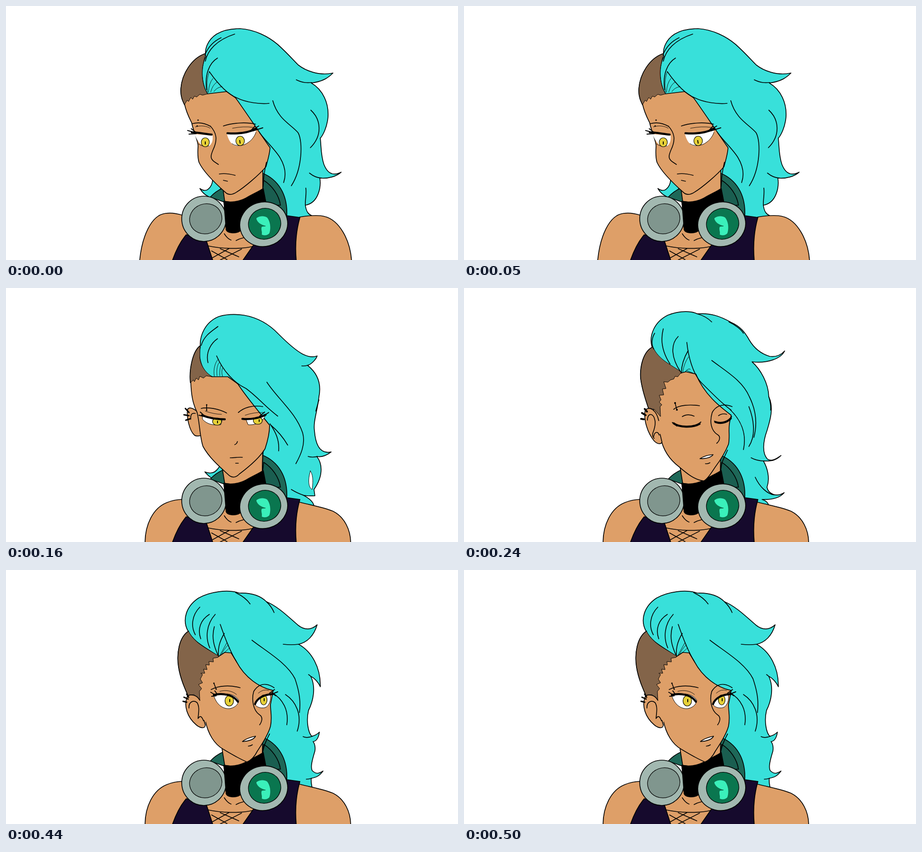
An HTML page for the animation above (0.54 s loop, 998x561 px).

```html
<!DOCTYPE html>
<html lang="en">
<head>
<meta charset="utf-8">
<title>Head turn</title>
<style>
html, body { margin: 0; height: 100%; overflow: hidden; background: #fff }
svg { display: block; width: 100vw; height: 100vh }
path, ellipse { stroke: #000; stroke-width: 1.7; stroke-linecap: round; stroke-linejoin: round; fill: none }
.hair { fill: #38e0da }
.skin { fill: #de9f68 }
.shaved { fill: #836449; stroke-width: 1 }
.vest { fill: #160a2d }
.black { fill: #000 }
.white { fill: #fff; stroke-width: 1 }
.bare { stroke: none }
.iris { fill: #e6d038; stroke-width: 1.2 }
.thin { stroke-width: .9 }
.lash { stroke-width: 4.5 }
.flick { stroke-width: 2 }
.ring { stroke-width: 3 }
.stud { stroke-width: 4 }
.band { fill: #1e6858 }
.deep { fill: #1a5e50 }
.cup { fill: #a2b8b0 }
.pad { fill: #80968e; stroke-width: 1.3 }
.disc { fill: #0a764f; stroke-width: 1.3 }
.leaf { fill: #3af0ba; stroke: #0b5a42; stroke-width: .8 }
</style>
</head>
<body>
<svg viewBox="0 0 998 561">
<!-- hair behind the body -->
<g data-pose="01">
  <path class="hair" d="M441 112C438 95 445 75 465 62C480 53 500 50 517 50C550 52 580 68 600 85C620 103 635 120 645 130C660 142 690 155 722 148C712 158 700 167 674 170C700 185 713 215 711 245C709 268 700 285 694 292C696 310 695 330 702 350C708 365 718 378 740 367C730 376 712 382 693 380C696 400 690 435 661 440C663 455 668 460 675 463L640 475L580 440L500 330L460 200L445 194C433 175 432 150 434 135C436 122 438 118 441 112Z"/>
  <path class="hair" d="M428 403C436 409 443 408 447 404C452 400 456 392 456 385L480 398L452 424C445 419 436 417 428 403Z"/>
</g>
<g data-pose="2">
  <path class="hair" d="M429 130C427 105 440 75 470 63C490 57 510 58 525 60C560 66 585 84 602 102C620 120 640 138 655 146C667 152 677 154 687 150C685 157 675 168 666 171C690 190 696 215 691 240C688 270 678 295 681 315C683 340 690 368 718 362C705 372 695 374 686 372C697 385 703 412 680 445L682 459C675 459 662 460 655 457C665 462 678 470 680 481L640 475L580 440L500 330L470 200L455 196C432 185 424 155 429 130Z"/>
  <path class="white" d="M672 404C680 415 677 435 676 445C668 441 666 425 672 404Z"/>
  <path class="hair" d="M439 406C447 410 457 409 462 405C468 400 472 395 474 388L481 402L458 423C450 417 445 414 439 406Z"/>
</g>
<g data-pose="3">
  <path class="hair" d="M415 130C408 105 420 75 450 60C480 48 505 52 515 57C545 55 565 62 590 76C610 85 620 97 630 115C640 132 655 145 675 151C690 153 700 148 708 139C700 156 670 167 636 163C655 180 672 210 673 240C685 265 675 295 669 315C660 340 658 365 670 378C680 384 690 377 700 370C690 380 680 383 661 382C670 397 676 420 669 440C672 455 690 463 707 452C697 464 680 468 658 467C668 470 672 475 673 481L640 475L580 440L500 330L485 200L478 188C450 165 425 160 415 130Z"/>
</g>
<g data-pose="4">
  <path class="hair" d="M402 135C388 110 398 80 425 62C450 48 490 42 515 51C540 50 560 55 575 70C600 80 625 105 645 122C660 134 675 132 687 121C680 145 665 160 646 164C675 180 695 215 694 258C690 248 680 238 673 235C685 260 678 290 668 310C662 335 668 360 675 367C682 366 688 362 692 358C690 372 685 378 678 379C683 385 683 395 682 400C676 420 672 435 676 443C685 452 692 449 700 444C692 455 685 458 674 460C673 470 675 475 676 481L640 475L580 440L500 330L475 205L468 190C440 170 415 160 402 135Z"/>
</g>

<!-- body and headphones -->
<path class="band" d="M451 422C460 412 470 406 479 402L484 434ZM566 369C600 383 622 415 620 462L575 445L566 405Z"/>
<path class="deep" d="M569 385C588 397 603 418 606 440L575 440L567 403Z"/>
<path class="skin" data-pose="01" d="M295 563C300 510 320 462 352 458C366 456 380 459 389 462L440 500L483 480L483 432L478 395L567 345L567 405L575 500L649 466C668 463 690 461 704 465C735 473 760 515 763 563Z"/>
<path class="skin" data-pose="234" d="M307 563C307 522 325 486 355 474C367 469 380 467 389 467L440 500L483 480L483 432L477 395L567 345L566 405L575 500L648 473C680 481 704 485 722 493C748 506 761 535 761 563Z"/>
<path d="M482 503C487 511 491 515 497 517M524 512Q515 514 508 518M447 530C475 536 515 538 545 531M473 536L514 554M454 541L488 560M520 537L473 561M492 536L456 556"/>
<path class="vest" d="M367 563C375 540 385 520 398 505L443 520L457 563ZM522 563L545 530L600 470L620 463L649 467C641 495 638 530 641 563Z"/>
<path class="black" d="M481 431C495 435 515 432 530 424C545 415 558 410 568 403L574 434C545 440 520 465 517 497C510 502 490 504 486 494Z"/>
<ellipse class="cup" cx="437" cy="470" rx="49" ry="50"/>
<ellipse class="pad" cx="441" cy="470" rx="36" ry="33" transform="rotate(-20 441 470)"/>
<path class="black" d="M481 431L505 434L517 490C512 502 490 504 486 494Z"/>
<ellipse class="cup" cx="569" cy="482" rx="53" ry="49" transform="rotate(-15 569 482)"/>
<ellipse class="disc" cx="571" cy="481" rx="36" ry="34" transform="rotate(-20 571 481)"/>
<path class="leaf" d="M552 469C558 463 570 462 577 467C584 476 586 490 582 502C577 508 569 508 564 505C566 499 561 491 565 487L573 486C563 484 554 478 552 469Z"/>

<!-- looking down -->
<g data-pose="01">
  <path class="skin" d="M394 216C398 235 405 248 410 258C413 275 425 300 424 310C423 325 423 335 426 345C435 365 460 390 486 413C492 418 500 416 506 413C525 402 560 372 574 355C578 340 582 328 583 313C560 280 530 235 507 203L487 189L445 194L420 180L395 200Z"/>
  <path class="shaved" d="M440 105C410 115 388 150 386 183C385 200 390 210 394 218L400 208L403 211L408 202L412 206L416 199L421 201L428 195L434 197L445 194C433 175 432 150 434 135Z"/>
  <path d="M440 105C410 115 388 150 386 183C385 200 390 210 394 218M449 145C470 175 490 195 510 203C530 213 560 217 581 215M560 280C575 300 595 318 605 335C614 350 620 370 613 390M589 209C600 250 630 262 645 280C656 300 654 360 630 397M673 230C695 250 700 285 672 313M641 163C655 170 665 170 675 169M670 369C680 377 690 380 697 380M662 402C664 415 660 430 661 440M440 122C445 98 465 75 505 62M440 106C447 90 458 78 475 70M443 185C438 150 450 125 467 115M575 345C570 365 568 385 567 405"/>
  <path class="thin" d="M445 191C442 170 445 155 449 145M447 191Q448 170 457 160M452 190Q456 174 466 168M459 189Q465 180 477 178M418 267C430 263 443 265 451 270M500 270Q525 265 545 268"/>
  <path class="white bare" d="M416 283L456 286C458 300 452 308 447 310C432 312 423 300 416 283ZM488 283C492 300 500 308 510 309C535 308 550 290 552 275Z"/>
  <path class="thin" d="M424 304Q436 313 448 309M499 304Q510 312 527 306C540 300 548 290 552 279"/>
  <g id="gaze">
    <ellipse class="iris" cx="440" cy="301" rx="9" ry="10"/>
    <ellipse class="iris" cx="517" cy="298" rx="9.5" ry="10.5"/>
    <path class="flick" d="M440 300v5M516 297l1 6"/>
  </g>
  <path class="lash" d="M410 279C425 279 440 283 454 284M489 281C515 283 535 280 553 271"/>
  <path class="flick" d="M401 275L416 279M404 283L420 282M409 271L418 278M545 276L567 269M543 274L558 265M540 276L550 265"/>
  <path d="M451 265C465 280 468 295 457 318C452 330 450 337 460 344L469 350M411 260C425 256 440 259 452 266M480 265C500 258 530 256 551 261M471 371C483 369 495 371 506 374M480 385L489 387"/>
  <path class="ring" d="M424 252h.1M422 265h.1"/>
</g>

<!-- glancing aside -->
<g data-pose="2">
  <path class="skin" d="M425 275C410 262 403 264 401 268C398 285 405 315 416 325C420 328 425 327 430 326Z"/>
  <path class="skin" d="M408 208C409 235 412 255 422 275C428 300 428 330 435 350C450 378 480 402 494 415C500 419 508 419 515 411C535 396 560 375 572 355C577 340 582 320 582 303C560 275 530 240 512 212L490 196L455 196L425 180L410 195Z"/>
  <path class="shaved" d="M428 128C412 140 404 180 407 209L414 203L416 207L420 199L425 203L428 195L436 199L442 194L455 196C438 185 430 170 428 155Z"/>
  <path d="M428 128C412 140 404 180 407 209M418 277C410 275 407 280 408 290M465 150C480 185 505 210 530 222C555 240 570 260 600 283M576 208C600 245 640 275 655 320C662 345 650 370 640 388M583 300C595 318 604 335 602 360M585 303C605 320 615 335 622 347M431 127C437 105 455 95 468 85M446 165C440 140 455 120 467 112M653 172Q660 173 668 170M691 247L684 272M667 372Q676 375 688 372M655 457Q643 453 630 445M568 360C566 380 566 395 566 405"/>
  <path class="thin" d="M460 195C457 180 462 163 469 157M466 194C464 178 468 165 472 164M472 194Q471 178 475 170M478 195Q475 185 478 177M440 272Q460 279 476 279M528 281Q548 274 568 275"/>
  <path class="white" d="M434 282L478 290L474 302C455 304 443 300 434 290ZM530 290L572 283C565 298 550 303 535 302Z"/>
  <ellipse class="iris" cx="466" cy="295" rx="10" ry="8"/>
  <ellipse class="iris" cx="556" cy="293" rx="10" ry="8"/>
  <path class="flick" d="M467 294v4M559 291v4"/>
  <path class="lash" d="M433 281C447 287 465 290 483 290M522 289C540 291 560 287 573 280"/>
  <path class="flick thin" d="M426 281L442 285M429 274L440 284M566 284L580 275M560 283L571 274"/>
  <path d="M431 266C445 262 470 267 487 276M513 275C525 264 545 258 567 262M505 346C508 345 510 343 511 339M495 375C505 375 515 373 522 374M507 387h6M443 258v12"/>
  <path class="ring" d="M443 258h.1M443 270h.1M396 266L404 275M393 280L404 282M397 292L406 289"/>
</g>

<!-- eyes closed -->
<g data-pose="3">
  <path class="skin" d="M434 330C440 360 455 380 475 395C490 408 510 425 530 426C540 420 548 405 555 395C570 375 580 355 584 345C588 325 582 310 588 290L590 281C565 262 530 235 512 190L490 185L478 188L450 185L415 230L420 285Z"/>
  <path class="shaved" d="M417 130C395 140 388 175 390 200C393 225 402 250 407 265L420 268L434 284L433 262L437 258L431 252L435 247L431 237L441 236L438 223L446 222L441 207L450 208L456 203L463 201L466 195L472 196L480 186C460 170 430 160 417 130Z"/>
  <path class="skin bare" d="M430 295C425 270 410 260 400 270C396 290 405 320 420 338C428 346 436 345 437 340L445 320Z"/>
  <path d="M417 130C395 140 388 175 390 200C393 225 402 250 407 265M430 293C425 270 410 260 400 270C396 290 405 320 420 338C428 346 436 345 437 340L433 323M405 292C405 275 418 276 421 290C424 300 421 310 417 320Q415 328 420 332M419 328C420 318 428 315 431 325"/>
  <path d="M440 90C432 120 440 145 455 168M473 107C455 125 458 155 478 185M419 135C412 122 416 108 421 100M492 120C495 150 505 190 525 210C550 235 570 255 590 270M547 160C580 185 615 205 630 240C645 270 648 300 640 330M587 268C610 290 625 320 617 357M629 262C640 290 645 325 629 350M515 57C530 61 540 68 547 75M585 75C600 82 612 92 617 100M495 138C485 155 480 170 480 188M634 375C645 381 655 382 663 382M643 418C653 440 670 455 685 457M673 240Q678 255 677 270M582 358C574 375 568 385 566 405"/>
  <path class="thin" d="M483 186Q486 165 496 152M487 186Q497 175 500 180M491 182L506 188"/>
  <path class="lash" d="M463 299C475 308 505 309 520 300M555 296C565 300 580 298 589 288"/>
  <path class="flick" d="M460 297L470 305M523 296L512 304M553 294L562 299M591 284L584 293"/>
  <path d="M463 268C474 258 500 257 520 260M482 284C490 279 500 279 508 283M592 262C570 253 555 262 548 275C542 295 545 315 560 324C567 328 565 337 558 343M562 282Q570 276 580 279M533 388Q538 389 543 386M466 254L470 269"/>
  <path class="white" style="stroke-width:1.7" d="M521 377C532 370 540 369 550 368C545 375 535 377 521 377Z"/>
  <path class="stud" d="M466 254h.1M470 269h.1M391 289L397 290M393 276L401 281M399 267L404 273"/>
</g>

<!-- looking back -->
<g data-pose="4">
  <path class="skin" d="M440 332C446 362 460 385 480 396C500 408 515 417 532 424C542 420 550 410 555 400C565 385 580 360 584 345C588 325 584 315 584 297L590 266C560 260 527 238 508 201L497 183L483 182L468 192L440 190L410 240L420 285Z"/>
  <path class="shaved" d="M403 135C382 148 376 185 381 215C385 240 395 262 402 278L415 275L428 288L427 268L432 262L425 253L434 249L429 241L434 231L430 228L439 228L436 219L444 220L441 209L449 210L448 202L458 203L457 195L468 193L470 190C440 172 415 160 403 135Z"/>
  <path class="skin bare" d="M428 290C422 275 405 273 400 280C392 300 400 325 420 342C428 349 440 352 440 338L448 320Z"/>
  <path d="M403 135C382 148 376 185 381 215C385 240 395 262 402 278M428 288C422 275 405 273 400 280C392 300 400 325 420 342C428 349 440 352 440 342L437 332M404 305C403 290 415 287 422 293C428 303 425 315 424 328M424 328C430 318 434 328 436 333"/>
  <path d="M428 82C410 100 408 125 418 143M449 98C430 110 422 130 430 152M462 98C442 120 440 150 450 172M460 125C453 150 460 170 468 188M473 120C485 155 495 180 508 201M482 140C470 160 468 175 469 190M507 50C520 56 532 65 539 75M575 70Q586 80 592 94M543 155C575 180 620 205 638 240C650 275 650 295 648 315M586 270C612 285 625 310 620 342M617 275C640 290 655 320 643 356M612 164Q630 166 646 164M656 368Q665 372 677 367M673 235Q670 232 668 231M663 462Q669 462 675 460M582 362C570 385 568 395 566 405"/>
  <path class="thin" d="M472 189L488 160M475 188Q480 176 491 165M479 185L494 172"/>
  <path class="white" d="M459 278C465 298 480 308 495 306C508 303 513 295 514 288C505 273 485 270 459 278ZM550 297C552 285 565 274 583 275C586 285 582 300 572 304C562 306 553 303 550 297Z"/>
  <ellipse class="iris" cx="493" cy="289" rx="9.5" ry="11.5"/>
  <ellipse class="iris" cx="569" cy="287" rx="7.5" ry="11"/>
  <path class="flick" d="M494 286v5M570 284v5"/>
  <path class="lash" d="M459 276C477 271 502 275 512 291M550 296C554 284 568 275 589 274"/>
  <path class="flick" d="M452 270L464 277M454 279L464 278M461 267L467 275M583 276L600 269M582 272L593 264M590 274L596 278"/>
  <path d="M453 264C470 255 495 254 517 260M592 260C570 245 555 255 547 268C542 285 545 310 560 320C568 325 565 335 560 342M535 389Q540 389 544 386M459 250L464 263"/>
  <path class="thin" d="M472 268C485 264 500 267 509 275M557 272Q568 262 580 266"/>
  <path class="white" style="stroke-width:1.7" d="M522 379C530 372 545 368 551 367C547 375 535 378 522 379Z"/>
  <path class="ring" d="M459 250h.1M464 263h.1M391 290L399 292M393 281L402 285M399 274L403 281"/>
</g>
</svg>
<script>
const ends = [80, 160, 240, 440, 540];
const parts = document.querySelectorAll('[data-pose]');
const gaze = document.getElementById('gaze');

function draw() {
  const t = performance.now() % 540;
  const pose = ends.findIndex(end => t < end);
  for (const part of parts)
    part.style.display = part.dataset.pose.includes(pose) ? '' : 'none';
  gaze.setAttribute('transform', `translate(${pose === 1 ? 3 : 0} 0)`);
  requestAnimationFrame(draw);
}
draw();
</script>
</body>
</html>
```
